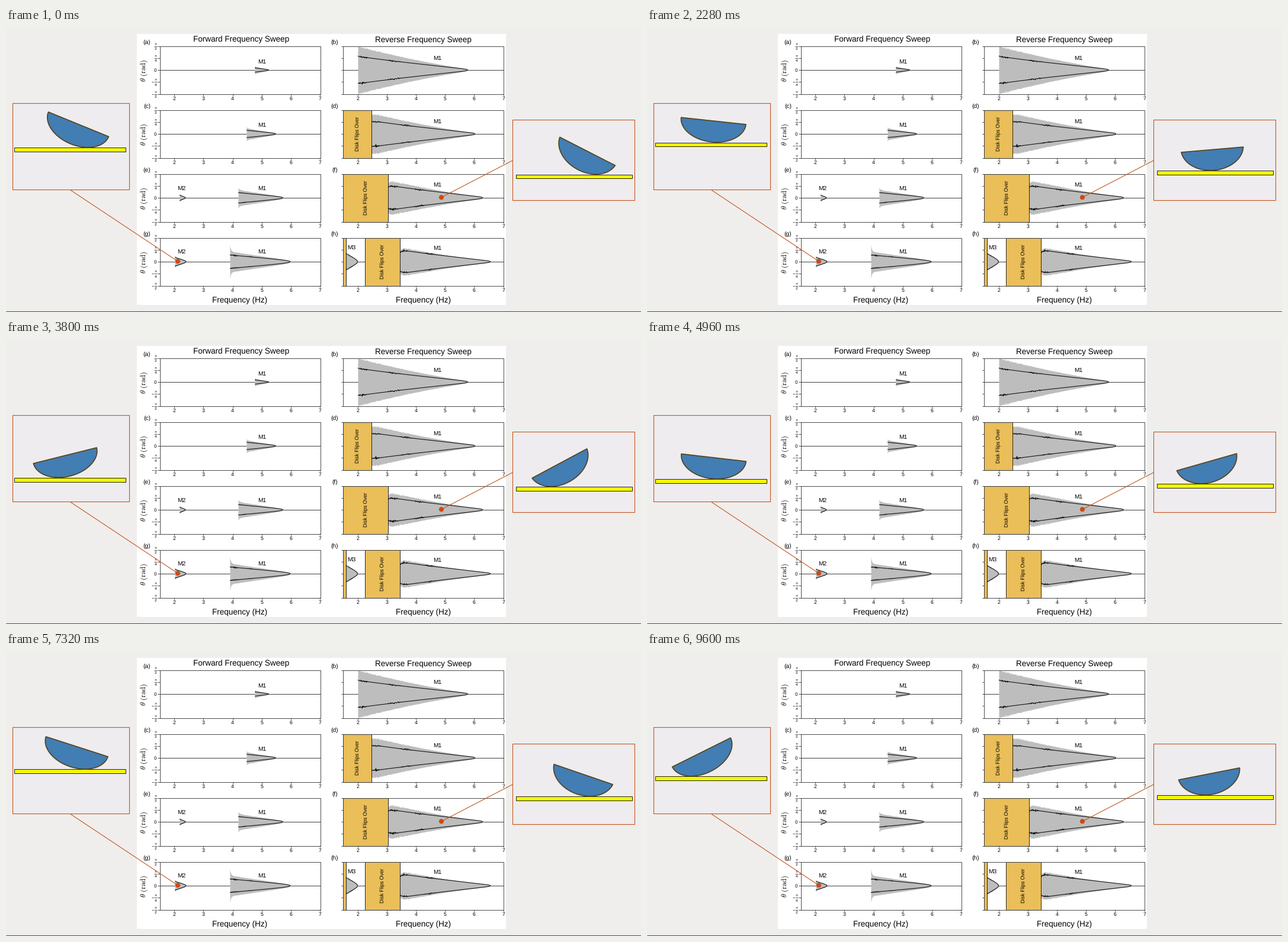
A matplotlib script that plays this animation: 1072x480 px, repeating every 9.64 s.

```python
import numpy as np
import matplotlib.pyplot as plt
from matplotlib.animation import FuncAnimation
from matplotlib.patches import Circle, Polygon, Rectangle

W, H, DPI = 1072, 480, 100
FRAMES, STEP = 241, 40
PT = 72 / DPI
INK, GREY, GOLD, RUST = "#141414", "#bdbdbd", "#eabe58", "#c4541f"
BG, CARD = "#efeeec", "#eeecee"
LEFT, RIGHT, SPAN, HALF, HZ = 259.5, 569, 271, 40.5, 49.2

plt.rcParams["font.family"] = "Liberation Sans"
plt.rcParams["mathtext.fontset"] = "cm"
plt.rcParams["text.hinting"] = "none"
rng = np.random.default_rng(4)
fig = plt.figure(figsize=(W / DPI, H / DPI), dpi=DPI, facecolor=BG)


def stage(z):
    ax = fig.add_axes([0, 0, 1, 1], zorder=z)
    ax.set(xlim=(0, W), ylim=(H, 0))
    ax.axis("off")
    return ax


def rect(ax, x0, y0, x1, y1, face, edge="none", lw=1.0, z=1):
    ax.add_patch(Rectangle((x0, y0), x1 - x0, y1 - y0, fc=face, ec=edge,
                           lw=lw * PT, zorder=z))


def line(ax, x, y, color=INK, lw=0.9, z=4):
    ax.plot(x, y, color=color, lw=lw * PT, zorder=z, solid_capstyle="butt")


def label(ax, x, y, text, size):
    ax.text(x, y + 0.36 * size, text, fontsize=size * PT, ha="center",
            va="baseline", color="black", zorder=6)


def upright(ax, x, y, text, size):
    ax.text(x, y, text, fontsize=size * PT, rotation=90, ha="center",
            va="center", color="black", zorder=6)


def fraction(ax, y, k):
    label(ax, 252.5, y - 4.5, r"$\pi$", 7)
    label(ax, 252.5, y + 4.3, str(4 // abs(k)), 6.5)
    line(ax, [250, 255], [y, y], lw=0.7)
    if k < 0:
        line(ax, [246, 248.5], [y, y], lw=0.7)


def plot_frame(ax, x0, cy, named):
    bottom = cy + HALF
    rect(ax, x0, cy - HALF, x0 + SPAN, bottom, "none", "#3a3a3a", 0.9, 5)
    line(ax, [x0, x0 + SPAN], [cy, cy], lw=0.8, z=1)
    for hz in range(2, 8):
        x = x0 + HZ * (hz - 1.5)
        line(ax, [x, x], [bottom, bottom + 2.5])
        label(ax, x, cy + 48.3, str(hz), 8.6)
    for k in range(-2, 3):
        y = cy - k * HALF / 2
        line(ax, [x0 - 3.5, x0], [y, y], "#3a3a3a")
        if named and k:
            fraction(ax, y, k)
        elif named:
            label(ax, 252, y, "0", 8)


def tongue(ax, x0, x1, cy, grey, black, bend, spike=0, rough=0.0, dip=0.0):
    """Response band that closes at x1, with the two sampled branches."""
    x = np.arange(x0, x1 + 0.01, 0.5)
    u = np.clip((x - x0) / (x1 - x0), 0, 1)
    near = np.exp(-(x - x0) / 4)
    close = np.sqrt(1 - u) * (1 - dip * near)
    band = grey * close * (1 - bend * u) + spike * near ** 3
    band *= 1 + 0.025 * rng.standard_normal(x.size) * (1 - u)
    ax.fill_between(x, cy - band, cy + band, color=GREY, lw=0, zorder=2)
    bursts = np.exp(-((x - x0 - 8) / 7) ** 2) + 0.7 * np.exp(-((u - 0.33) / 0.05) ** 2)
    for s in (-1, 1):
        branch = black * close * (1 - 0.85 * bend * u)
        branch += rough * bursts * rng.standard_normal(x.size)
        line(ax, x, cy + s * branch, lw=1.1)


def flips(ax, x0, x1, cy, named=True):
    rect(ax, x0, cy - HALF, x1, cy + HALF, GOLD, INK, 0.9, 3)
    if named:
        upright(ax, (x0 + x1) / 2 + 0.8, cy - 0.7, "Disk Flips Over", 8.6)


def forward(ax, r, cy):
    tongue(ax, 420 - 14 * r, 443.5 + 12.2 * r, cy, 6 + 3.9 * r, 3.6 + 2.6 * r,
           0.4, spike=1.5 + 0.35 * r ** 3, rough=0.15 * r)
    label(ax, 432, cy - 15 - r, "M1", 10.3)
    if r >= 2:
        grow = r - 2
        tongue(ax, 293 - 8 * grow, 303 + grow, cy, 5 + 3 * grow, 4.5 + 3 * grow,
               0.4, spike=2)
        label(ax, 296, cy - 17 - grow, "M2", 10.3)


def reverse(ax, r, cy, start):
    tongue(ax, start, 779.5 + 12.9 * r, cy, 40 - 5 * r, 23 - r, 0.7,
           rough=0.9, dip=0.08 * r)
    label(ax, 728, cy - 20.5 - r, "M1", 10.3)
    if r == 3:
        flips(ax, RIGHT, 573.5, cy, named=False)
        tongue(ax, 574, 593.5, cy, 14.5, 14, 0.4, rough=0.2)
        label(ax, 583.5, cy - 23.5, "M3", 10.3)
        flips(ax, 605.5, start - 0.5, cy)
    elif r:
        flips(ax, RIGHT, start - 0.5, cy)


def callout(ax, x0, y0, x1, y1, wire, dot):
    rect(ax, x0, y0, x1, y1, CARD, RUST, 1.1, 7)
    line(ax, *zip(wire, dot), RUST, 1.1, 8)
    ax.add_patch(Circle(dot, 3.6, fc="#d2490f", ec="#b5410f", lw=0.5, zorder=9))


def backdrop(ax):
    line(ax, [0, W], [479.3, 479.3], "#55565a", 1.2)
    rect(ax, 221, 10, 844, 467.5, "white", z=0)
    label(ax, 397, 18.7, "Forward Frequency Sweep", 13.5)
    label(ax, 704.8, 19.2, "Reverse Frequency Sweep", 13.5)
    for r, start in enumerate((594, 617, 645, 665)):
        cy = 71 + 108 * r
        for x0, draw, args in ((LEFT, forward, ()), (RIGHT, reverse, (start,))):
            plot_frame(ax, x0, cy, x0 == LEFT)
            draw(ax, r, cy, *args)
        upright(ax, 233.5, cy + 0.5, r"$\theta\ \mathrm{(rad)}$", 12.6)
        for k, x in enumerate((238, 555)):
            label(ax, x, cy - 47.5, f"({'abcdefgh'[2 * r + k]})", 10.2)
    for x in (395, 704.7):
        label(ax, x, 459.5, "Frequency (Hz)", 13.5)
    callout(ax, 10.9, 126.9, 207.5, 273.4, (109, 274), (290, 394.3))
    callout(ax, 854.9, 154.9, 1060.9, 290.9, (855, 224), (735, 286.3))


# The plots never move, so they are rendered once.
base = stage(0)
backdrop(base)
fig.canvas.draw()
picture = np.asarray(fig.canvas.buffer_rgba()).copy()
base.remove()
fig.figimage(picture, zorder=0)
ax = stage(1)


class Rocker:
    """Half disk that rocks without leaving its yellow table."""

    def __init__(self, x0, x1, mid, a, b, cut, slide):
        self.x0, self.x1, self.mid, self.slide = x0, x1, mid, slide
        lo = np.arcsin(cut / b)
        s = np.linspace(lo, np.pi - lo, 70)
        self.shape = np.array([a * np.cos(s), b * np.sin(s) - cut])
        self.bar = ax.add_patch(Polygon([[0, 0]] * 3, fc="#f3f800", ec="#26260a",
                                        lw=1.0 * PT, zorder=2))
        self.disk = ax.add_patch(Polygon([[0, 0]] * 3, fc="#427db3", ec="#55431d",
                                         lw=1.7 * PT, joinstyle="round", zorder=3))

    def pose(self, theta, y):
        c, s = np.cos(theta), np.sin(theta)
        px, py = np.array([[c, -s], [s, c]]) @ self.shape
        px = px + self.mid + self.slide * theta
        py = py + y - 0.5 - py.max()
        self.disk.set_xy(np.column_stack([px, py]))
        self.bar.set_xy([(self.x0, y), (self.x1, y),
                         (self.x1, y + 6.8), (self.x0, y + 6.8)])


left = Rocker(13.7, 202.2, 108.5, 55, 35.7, 0, 36)
right = Rocker(860.7, 1056.6, 958.5, 52.7, 38.5, 3.5, 49)


def chirp(t, start, rate, drift):
    return 2 * np.pi * (start + rate * t + drift * t * t)


def update(i):
    t = i * STEP / 1000
    # Left: table and disk share one rate, sweeping up.
    p = chirp(t, 0.154, -0.914, -0.0065)
    left.pose(np.radians(27) * np.sin(p), 214.5 - 21.5 * np.cos(p))
    # Right: the table moves twice per swing, sweeping down.
    q = chirp(t, 0.296, 2.498, -0.0037)
    right.pose(np.radians(28.3) * np.sin(q), 244.6 - 3.6 * np.cos(2 * q))
    return left.bar, left.disk, right.bar, right.disk


anim = FuncAnimation(fig, update, frames=FRAMES, interval=STEP, repeat=True,
                     repeat_delay=0, init_func=lambda: update(0))
plt.show()
```
